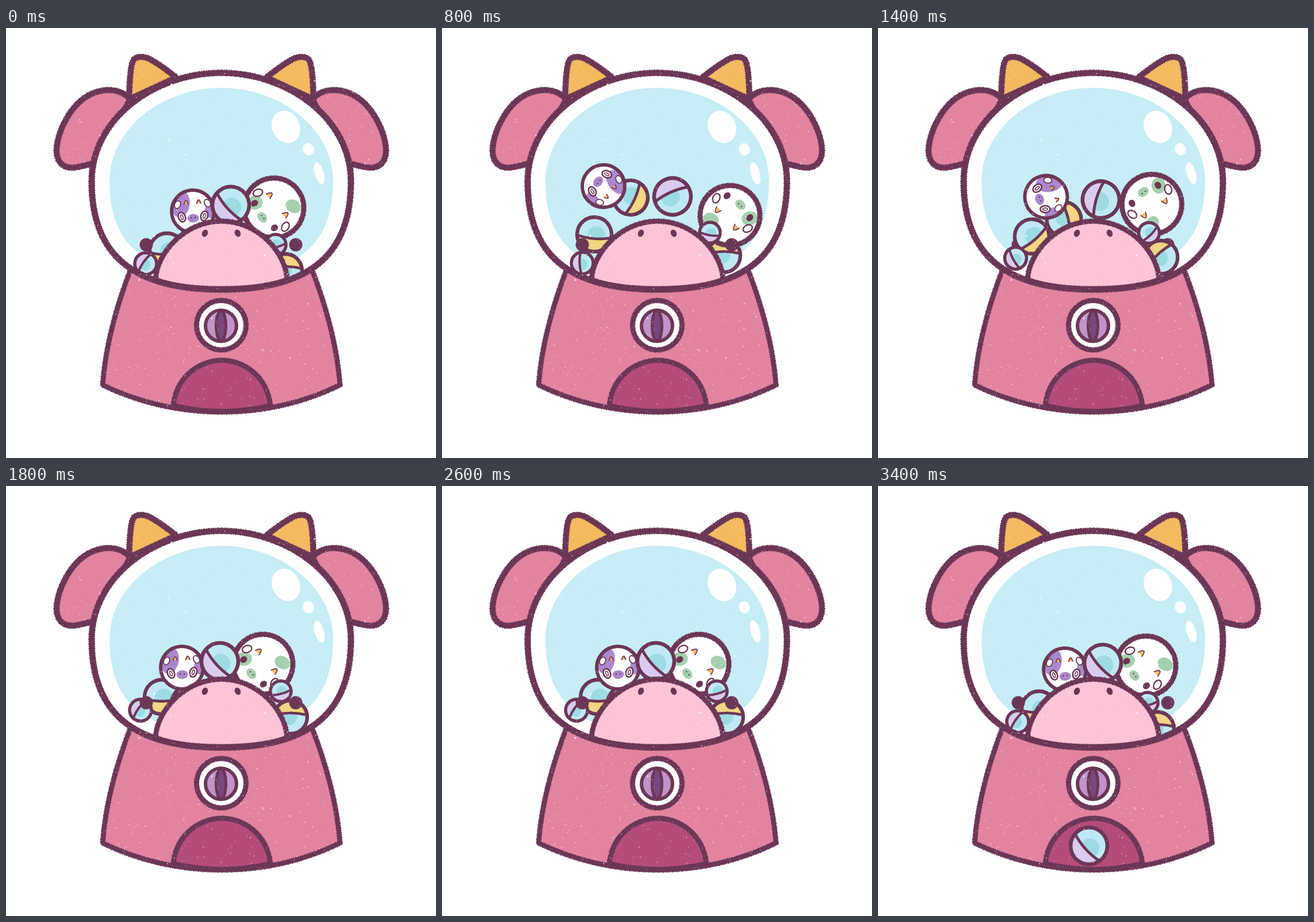
Animation, 748 px wide and 748 px high, one loop 3.5 s. Source, as an HTML page with a canvas:

```html
<!DOCTYPE html>
<html lang="en">
<head>
<meta charset="utf-8">
<title>Gumball machine</title>
<style>
html, body { margin: 0; width: 100%; height: 100%; overflow: hidden; background: #fff; }
canvas { display: block; }
</style>
</head>
<body>
<canvas id="stage" width="748" height="748"></canvas>
<script>
const SIZE = 748, STEP = 200, LOOP = 3500, LAST = 17, MID = 374.5;
const C = {
  line: '#6b3655', pink: '#e284a0', pale: '#fdc4d6', berry: '#b44c79', horn: '#f3ba60',
  glass: '#c6eef4', cyan: '#bfe9f2', teal: '#9cdbe2', lilac: '#d9cbee', yellow: '#f4d583',
  purple: '#ab87cc', green: '#a5cfae'
};

const canvas = document.getElementById('stage');
let ctx = canvas.getContext('2d');

function randomizer(seed) {
  return () => (seed = (seed * 16807) % 2147483647) / 2147483647;
}

function layer(size, paint) {
  const sheet = document.createElement('canvas');
  sheet.width = sheet.height = size;
  const main = ctx;
  ctx = sheet.getContext('2d');
  paint();
  ctx = main;
  return sheet;
}

const ink = ctx.createPattern(layer(256, () => {
  const rnd = randomizer(71);
  ctx.fillStyle = C.line;
  ctx.fillRect(0, 0, 256, 256);
  for (let i = 0; i < 1500; i++) {
    ctx.fillStyle = `rgba(225,190,210,${0.1 + rnd() * 0.4})`;
    ctx.fillRect(rnd() * 256, rnd() * 256, 0.6 + rnd(), 0.6 + rnd());
  }
}), 'repeat');

function draw(path, fill, width) {
  if (fill) {
    ctx.fillStyle = fill;
    ctx.fill(path);
  }
  if (!width) return;
  ctx.strokeStyle = ink;
  ctx.lineWidth = width;
  ctx.lineJoin = ctx.lineCap = 'round';
  ctx.stroke(path);
  if (width >= 8) {
    // Fine dashes slightly wider than the line give it a chalky edge.
    ctx.lineCap = 'butt';
    ctx.lineWidth = width + 1.6;
    ctx.setLineDash([1.5, 2, 3, 1.7]);
    ctx.stroke(path);
    ctx.setLineDash([]);
  }
}

function oval(x, y, rx, ry = rx, deg = 0) {
  const path = new Path2D();
  path.ellipse(x, y, rx, ry, deg * Math.PI / 180, 0, Math.PI * 2);
  return path;
}

function mirrored(paint) {
  paint();
  ctx.save();
  ctx.translate(MID * 2, 0);
  ctx.scale(-1, 1);
  paint();
  ctx.restore();
}

const globe = new Path2D('M374.5 78C258 78 149 158 149 267C149 390 215 455 374.5 455C534 455 600 390 600 267C600 158 491 78 374.5 78Z');
const body = new Path2D('M220 412C191 485 173 555 168 621C230 651 300 668 375 668C450 668 520 651 581 621C576 555 558 485 529 412Z');
const dome = new Path2D('M260 437C263 390 312 336 375 336C438 336 486 390 489 437C452 459 297 459 260 437Z');
const ear = new Path2D('M216 124C200 105 170 103 144 117C111 135 90 180 88 210C87 234 100 244 118 243Q138 240 158 233Z');
const horn = new Path2D('M214 124C215 95 216 68 221 57C226 48 240 49 250 54Q270 65 296 86Z');
const chute = new Path2D('M291 657C296 604 340 578 375 578C412 578 454 604 460 657Q375 677 291 657Z');

function paintBack() {
  ctx.fillStyle = '#fff';
  ctx.fillRect(0, 0, SIZE, SIZE);
  mirrored(() => {
    draw(ear, C.pink, 9.5);
    draw(horn, C.horn, 9.5);
  });
  draw(body, C.pink, 8);
  draw(globe, '#fff');
  ctx.save();
  ctx.translate(MID, 267);
  ctx.scale(0.862, 0.862);
  ctx.translate(-MID, -267);
  draw(globe, C.glass);
  ctx.restore();
  draw(chute, C.berry, 8);
}

function paintFront() {
  draw(dome, C.pale, 8);
  mirrored(() => draw(oval(346, 357, 5, 6.5, 25), C.line));
  draw(globe, null, 10);
  draw(oval(MID, 517, 43), '#fff', 8);
  draw(oval(374, 518, 27), '#c194c8', 6);
  draw(oval(374, 518, 8.5, 26), '#7a477d', 5);
  draw(oval(487, 172, 24, 29, -25), '#fff');
  draw(oval(526, 211, 9.5, 11, -20), '#fff');
  draw(oval(545, 253, 8, 20, -15), '#fff');
}

function paintGrain() {
  const rnd = randomizer(2024);
  for (let i = 0; i < 2400; i++) {
    const x = rnd() * SIZE, y = rnd() * SIZE;
    const r = rnd() < 0.02 ? 1.6 : 0.3 + rnd() * 0.6;
    draw(oval(x, y, r), `rgba(255,255,255,${0.4 + rnd() * 0.6})`);
  }
}

function capsule(r, color) {
  const edge = r * 0.12, bulge = r * 0.38;
  const curve = `M${-r} ${edge}Q0 ${bulge} ${r} ${edge}`;
  const rim = oval(0, 0, r);
  draw(rim, color);
  ctx.save();
  ctx.clip(rim);
  ctx.save();
  ctx.clip(new Path2D(`${curve}V${-r}H${-r}Z`));
  draw(rim, C.cyan);
  draw(oval(r * 0.12, r * 0.04, r * 0.52), C.teal);
  ctx.restore();
  draw(new Path2D(curve), null, 3 + r * 0.06);
  ctx.restore();
  draw(rim, null, 4 + r * 0.08);
}

function tinyHorn(x, y, s) {
  draw(new Path2D(`M${x - s} ${y + s}Q${x} ${y - s * 2.4} ${x + s} ${y + s}`), C.horn, 1.8);
}

function snout(y, color) {
  draw(oval(0, y, 10, 7.5), color);
  for (const side of [-1, 1]) draw(oval(side * 3.5, y - 1, 1.3), C.line);
}

function purpleCow(r) {
  const rim = oval(0, 0, r);
  draw(rim, '#fff');
  ctx.save();
  ctx.clip(rim);
  draw(oval(-20, -13, 15, 23, 15), C.purple);
  draw(oval(30, 0, 9, 13), C.purple);
  ctx.restore();
  for (const side of [-1, 1]) {
    draw(oval(side * 26, -13, 5, 7, side * -25), '#fff', 1.8);
    draw(oval(side * 19.5, 9, 6, 8.5, side * 20), '#fff', 2.6);
    draw(oval(side * 19.5, 9, 2, 4.5, side * 20), null, 1.6);
    tinyHorn(side * 11, -17, 3.5);
  }
  snout(12, C.purple);
  draw(rim, null, 6);
}

function greenCow(r) {
  const rim = oval(0, 0, r);
  draw(rim, '#fff');
  draw(oval(-28, 20, 12, 14, 30), C.green);
  draw(oval(19, -28, 14, 11, -20), C.green);
  for (const side of [-1, 1]) {
    draw(oval(side * 38, 5, 6, 8.5, side * -20), '#fff', 2.4);
    draw(oval(side * 27.5, 21, 5.5, 6.5), C.line);
    tinyHorn(side * 22, -10, 5);
  }
  snout(26, C.green);
  draw(rim, null, 8);
}

function drawBall({ kind, r }, { x, y, deg }) {
  ctx.save();
  ctx.translate(x, y);
  ctx.rotate(deg * Math.PI / 180);
  if (kind === 'purple') purpleCow(r);
  else if (kind === 'green') greenCow(r);
  else capsule(r, C[kind]);
  ctx.restore();
}

// A ball starts at (x, y), travels by (dx, dy) and turns by spin during each jump.
const ball = (kind, r, x, y, dx, dy, deg, spin) => ({ kind, r, x, y, dx, dy, deg, spin });
const balls = [
  ball('yellow', 29, 495, 402, -5, -6, 180, 0),
  ball('yellow', 30, 271, 367, -6, -8, 0, 5),
  ball('yellow', 30, 318, 378, 10, -83, -150, 85),
  ball('purple', 37, 306, 316, -25, -41, -3, 133),
  ball('green', 52, 447, 310, 54, 16, 51, 173),
  ball('lilac', 32, 372, 305, 29, -12, 48, 108),
  ball('lilac', 19, 234, 390, 10, 19, 125, -37),
  ball('lilac', 18, 478, 357, -12, -1, -15, 25)
];
const prize = balls.find(b => b.kind === 'lilac');

function jumpPose({ x, y, dx, dy, deg, spin }, u) {
  const eased = u ** 1.5, arch = Math.sin(Math.PI * u);
  const falling = dy > 0 ? 14 : 0;
  const rock = Math.abs(spin) < 50 ? -50 : 0;
  return {
    x: x + dx * eased,
    y: y + dy * eased - falling * arch * Math.sign(dx) * (spin > 50),
    deg: deg + spin * eased + rock * arch
  };
}

// At rest the rolling balls lean right and the wedged ones sink behind the dome.
function restPose({ x, y, deg, spin }) {
  return spin > 100
    ? { x: x + 19, y: y + 3, deg }
    : { x: x + 9 * Math.sign(MID - x), y: y + 20, deg };
}

function drawDots() {
  for (const x of [244, 504]) draw(oval(x, 377, 11.5), ink);
}

const back = layer(SIZE, paintBack);
const front = layer(SIZE, paintFront);
const grain = layer(SIZE, paintGrain);

function frame(now) {
  const step = Math.floor((now % LOOP) / STEP);
  const resting = step === 0 || step === LAST;
  const phase = (step + 3) % 4;
  const dotsBehind = phase === 2;

  ctx.drawImage(back, 0, 0);
  ctx.save();
  ctx.clip(globe);
  if (dotsBehind) drawDots();
  for (const b of balls) drawBall(b, resting ? restPose(b) : jumpPose(b, phase / 3));
  if (!dotsBehind) drawDots();
  ctx.restore();
  if (step === LAST) drawBall(prize, { x: 367, y: 626, deg: 48 });
  ctx.drawImage(front, 0, 0);
  ctx.drawImage(grain, 0, 0);
  requestAnimationFrame(frame);
}
requestAnimationFrame(frame);
</script>
</body>
</html>
```
